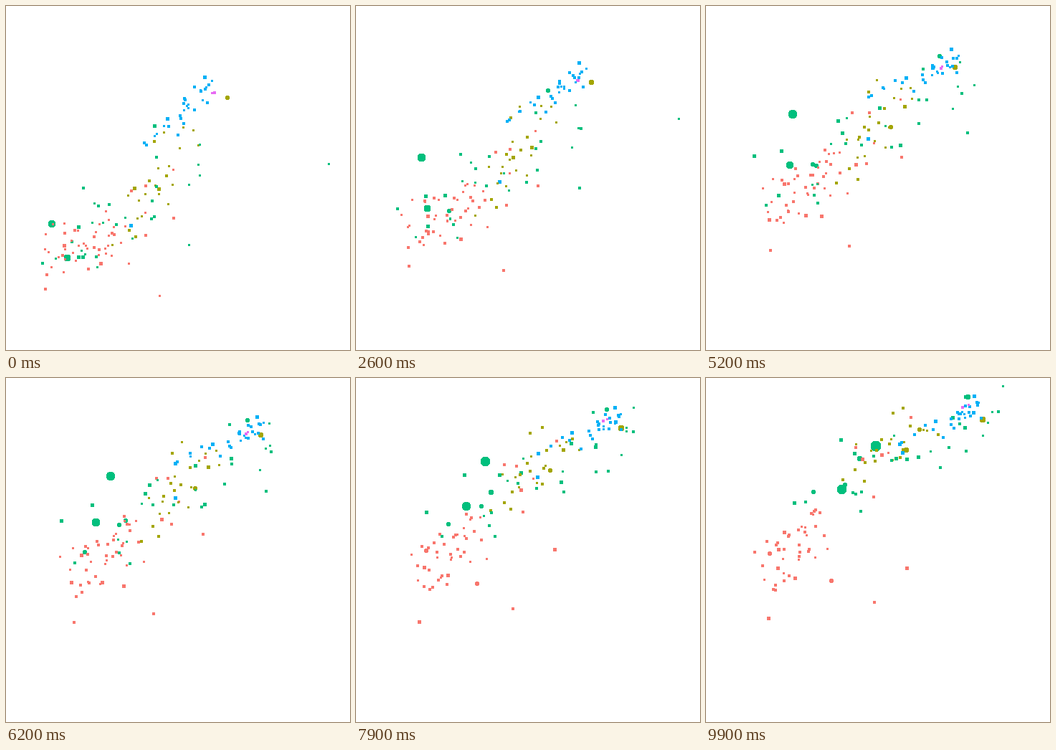
Write a matplotlib script that moves like this. It is 480 px wide and 480 px high and loops after 10000 ms.

```python
import numpy as np
import matplotlib.pyplot as plt
from matplotlib.animation import FuncAnimation

SIZE, DPI = 480, 100
FRAMES, INTERVAL = 100, 100
STATES = 12                      # one state every nine frames
STEP = (FRAMES - 1) / (STATES - 1)
MID = 5.8                        # state of the middle key point
MAX_POP = 1318                   # millions, largest dot
STATE_IDS = np.arange(STATES)

rng = np.random.default_rng(11)

COLORS = {
    "africa": "#F8766D",
    "americas": "#A3A500",
    "asia": "#00BF7D",
    "europe": "#00B0F6",
    "oceania": "#E76BF3",
}
GROWTH = {"africa": 3.3, "americas": 2.4, "asia": 2.5, "europe": 1.4, "oceania": 2.2}

# Dots with an irregular route: first and last population, then (state, x, y).
ROUTES = [
    ("asia", 556, 1318, [(0, 64, 304), (1, 89, 257), (2, 78, 300), (3, 93, 200),
                         (4, 100, 166), (6, 124, 149), (7, 149, 136),
                         (9, 184, 114), (11, 237, 95)]),
    ("asia", 372, 1110, [(0, 85, 351), (4, 105, 256), (7, 126, 199), (11, 189, 155)]),
    ("asia", 0.2, 2.5, [(0, 450, 220), (4, 450, 133), (5, 409, 122),
                        (6, 365, 107), (8, 372, 79), (11, 393, 62)]),
]

# Large dots: population, then start, middle and end position.
MOVERS = {
    "asia": [
        (82, 107, 350, 154, 222, 214, 112),
        (55, 101, 308, 149, 220, 194, 149),
        (50, 101, 350, 100, 265, 150, 159),
        (65, 207, 167, 329, 68, 365, 26),
        (28, 92, 329, 103, 202, 188, 86),
        (25, 144, 277, 191, 177, 207, 105),
        (23, 108, 254, 184, 159, 265, 112),
        (21, 203, 297, 273, 194, 296, 110),
        (20, 129, 279, 243, 141, 344, 55),
        (20, 51, 359, 66, 206, 123, 174),
        (4, 255, 333, 369, 174, 339, 97),
    ],
    "africa": [
        (36, 132, 359, 162, 292, 175, 283),
        (23, 151, 319, 210, 222, 245, 107),
        (21, 57, 375, 89, 298, 101, 239),
        (14, 234, 296, 274, 206, 280, 265),
        (4, 214, 404, 198, 333, 235, 313),
    ],
    "americas": [
        (135, 309, 128, 348, 85, 386, 58),
        (65, 179, 254, 260, 168, 279, 100),
        (37, 213, 255, 279, 139, 298, 72),
    ],
    "europe": [(40, 174, 306, 227, 184, 274, 104)],
}

# Small dots strewn along a bent line that itself moves:
# count, bend, median population, spread, lines at start, middle and end.
CROWDS = {
    "africa": (47, .85, 2.8, (19, 27),
               [(55, 360), (155, 312), (210, 265)],
               [(90, 305), (180, 205), (250, 165)],
               [(85, 300), (150, 190), (275, 85)]),
    "americas": (22, .8, 3.2, (17, 17),
                 [(165, 330), (230, 210), (285, 140)],
                 [(200, 245), (245, 135), (310, 90)],
                 [(200, 140), (285, 75), (345, 50)]),
    "asia": (19, .6, 3.5, (24, 25),
             [(80, 350), (175, 270), (260, 220)],
             [(95, 275), (270, 135), (350, 115)],
             [(150, 170), (335, 75), (385, 45)]),
    "europe": (29, .45, 8, (8, 8),
               [(195, 195), (255, 140), (285, 105)],
               [(225, 125), (325, 88), (350, 72)],
               [(270, 92), (362, 50), (378, 38)]),
    "oceania": (2, .5, 4, (1, 1),
                [(286, 123), (288, 122), (290, 121)],
                [(331, 85), (328, 87), (325, 89)],
                [(371, 36), (361, 40), (352, 43)]),
}


def through(times, points):
    """Positions at every state along straight legs between points."""
    x, y = np.transpose(points)
    return np.column_stack([np.interp(STATE_IDS, times, x),
                            np.interp(STATE_IDS, times, y)])


def along(line, bend, u):
    x, y = np.transpose(line)
    return np.column_stack([np.interp(u, (0, bend, 1), x),
                            np.interp(u, (0, bend, 1), y)])


tracks, pops, colors = [], [], []


def add(region, track, first, last):
    tracks.append(track)
    pops.append(np.geomspace(first, last, STATES))
    colors.append(COLORS[region])


for region, first, last, route in ROUTES:
    times, *points = zip(*route)
    add(region, through(times, list(zip(*points))), first, last)

for region, rows in MOVERS.items():
    for pop, *xy in rows:
        track = through((0, MID, STATES - 1), np.reshape(xy, (3, 2)))
        add(region, track, pop, pop * GROWTH[region])

for region, (count, bend, median, spread, *lines) in CROWDS.items():
    u = (np.arange(count) + .5) / count
    shift = np.clip(rng.normal(size=(count, 2)), -1.9, 1.9) * spread
    keys = np.array([along(line, bend, u) + shift for line in lines])
    sizes = np.clip(median * np.exp(rng.normal(0, 1, count)), .1, 50)
    for i, pop in enumerate(sizes):
        wander = rng.normal(0, .12, (STATES, 2)) * spread
        track = through((0, MID, STATES - 1), keys[:, i]) + wander
        add(region, track, pop, pop * GROWTH[region])

tracks, pops = np.array(tracks), np.array(pops)


def at(values, state):
    i = min(int(state), STATES - 2)
    f = state - i
    return values[:, i] * (1 - f) + values[:, i + 1] * f


def diameter(pop):
    """Whole-pixel dot width; the area grows with the population."""
    size = 1 + 5 * np.sqrt(np.clip(pop / MAX_POP, 0, 1))
    return np.round(.75 * (2.845 * size + .94))


def snap(xy, width):
    """Centre odd dots on a pixel and even dots on a pixel edge."""
    odd = (width % 2 == 1)[:, None]
    return np.where(odd, np.floor(xy) + .5, np.round(xy))


fig = plt.figure(figsize=(SIZE / DPI, SIZE / DPI), dpi=DPI, facecolor="white")
ax = fig.add_axes([0, 0, 1, 1])
ax.set_xlim(0, SIZE)
ax.set_ylim(SIZE, 0)
ax.axis("off")
dots = ax.scatter(*tracks[:, 0].T, s=np.full(len(tracks), 4.0), c=colors,
                  linewidths=0, antialiased=False)


def draw(frame):
    state = frame / STEP
    width = diameter(at(pops, state))
    dots.set_offsets(snap(at(tracks, state), width))
    dots.set_sizes(((width - .24) * 72 / DPI) ** 2)
    return (dots,)


anim = FuncAnimation(fig, draw, frames=FRAMES, interval=INTERVAL,
                     repeat=True, repeat_delay=0)
plt.show()
```
